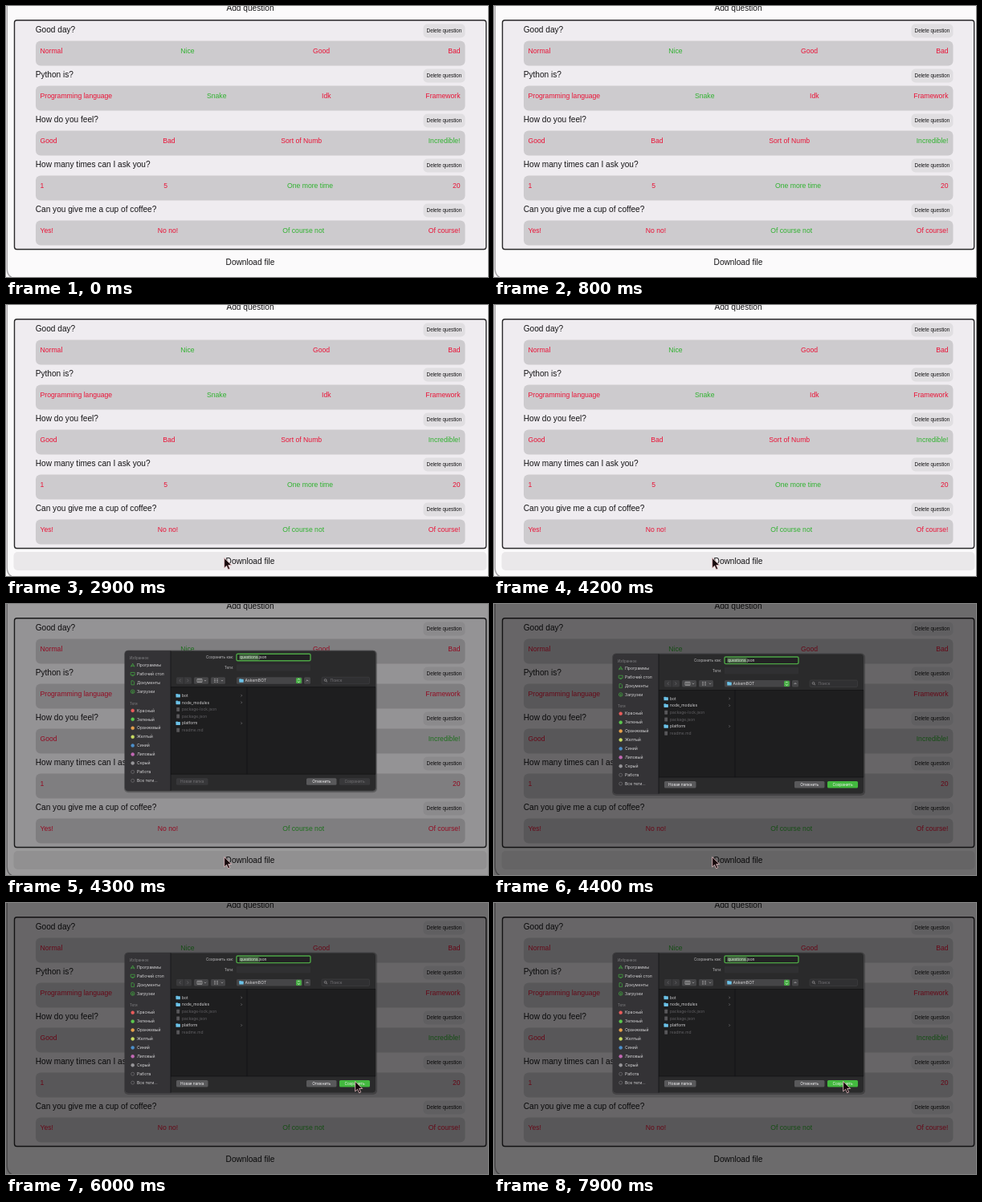
Write an HTML page that moves like this. It is 600x338 px and loops after 8000 ms.

```html
<!DOCTYPE html>
<html lang="en">
<head>
<meta charset="utf-8">
<title>Quiz editor</title>
<style>
  html, body { margin: 0; width: 100%; height: 100%; overflow: hidden; background: #fbfafb; }
  svg { display: block; width: 100%; height: 100%; }
  #page text { font-family: "Liberation Sans", Arial, sans-serif; }
  #dialog text { font-family: Inter, Roboto, sans-serif; }
</style>
</head>
<body>
<svg id="stage" viewBox="0 0 600 338">
  <g id="page"></g>
  <rect id="shade" width="600" height="338" opacity="0"/>
  <g id="dialog"></g>
  <path id="cursor" d="M0 0V12.5L2.9 9.8L4.9 14.3L7 13.4L5 9H9Z" fill="#16090c" stroke="#ecc4c8" stroke-width=".8"/>
</svg>
<script>
const LOOP = 8000, STEP = 100;
const INK = '#151416', RED = '#ea1236', GREEN = '#2fb22f';
const $ = id => document.getElementById(id);
const page = $('page'), dialog = $('dialog');

function add(parent, tag, attrs, content) {
  const el = document.createElementNS('http://www.w3.org/2000/svg', tag);
  for (const k in attrs) el.setAttribute(k, attrs[k]);
  if (content) el.textContent = content;
  return parent.appendChild(el);
}
const box = (parent, x, y, width, height, rx, fill, more) =>
  add(parent, 'rect', { x, y, width, height, rx, fill, ...more });
const line = (parent, d, stroke, width = .7) =>
  add(parent, 'path', { d, stroke, 'stroke-width': width, fill: 'none' });
// y is the middle of the lower-case letters plus ascenders
const label = (parent, x, y, str, size, fill, anchor = 'start') =>
  add(parent, 'text', { x, y: y + size * .34, 'font-size': size, fill, 'text-anchor': anchor }, str);

// Page: [question, index of the right answer, answers, x of the inner answers]
const quiz = [
  ['Good day?', 1, ['Normal', 'Nice', 'Good', 'Bad'], [217.3, 382]],
  ['Python is?', 1, ['Programming language', 'Snake', 'Idk', 'Framework'], [250, 393]],
  ['How do you feel?', 3, ['Good', 'Bad', 'Sort of Numb', 'Incredible!'], [195.3, 342.3]],
  ['How many times can I ask you?', 2, ['1', '5', 'One more time', '20'], [196.3, 350]],
  ['Can you give me a cup of coffee?', 2, ['Yes!', 'No no!', 'Of course not', 'Of course!'], [188.8, 344.3]]
];

box(page, 0, 0, 600, 338, 0, '#fbfafb');
line(page, 'M1.3 0V328Q1.3 336 8 339', '#a5a3a6', 1.4);
label(page, 304, 2.7, 'Add question', 10.15, INK, 'middle');
box(page, 10.5, 17.8, 587.2, 285.7, 3, '#efecf0', { stroke: '#29282a', 'stroke-width': 1.4 });
const hover = box(page, 9.5, 308, 589, 23, 5, '#eae8ea');
label(page, 304, 319.7, 'Download file', 10.15, INK, 'middle');

quiz.forEach(([question, right, answers, inner], row) => {
  const y = 30 + row * 56;
  label(page, 36.7, y, question, 10.15, INK);
  box(page, 519.5, y - 7.5, 52, 17, 5, '#e0dee1');
  label(page, 545.5, y + 1.2, 'Delete question', 6.3, INK, 'middle');
  box(page, 37, y + 13.5, 534.5, 31, 6, '#cdcbce');
  answers.forEach((answer, i) =>
    label(page, [42.5, ...inner, 565.5][i], y + 26.4, answer, 8.65,
      i === right ? GREEN : RED, i === 3 ? 'end' : 'start'));
});

// Save dialog
const PALE = '#d6d5d7', DIM = '#626164', ACCENT = '#46ad43', FIELD = '#303032';
box(dialog, 147, 61.5, 315, 177.5, 5, '#000', { opacity: .25 });
box(dialog, 148, 62, 312.5, 175, 4, '#2a2a2b', { stroke: '#4c4c4e', 'stroke-width': .7 });
line(dialog, 'M205 62.4H152Q148.4 62.4 148.4 66V233Q148.4 236.6 152 236.6H205Z', 'none')
  .setAttribute('fill', '#343336');
box(dialog, 205, 107.5, 255.2, 108.5, 0, '#1e1e1f');
line(dialog, 'M205 62.4V236.6M205 107.5H460M205 216H460M300 107.5V216', '#111112');

label(dialog, 154, 71.3, 'Избранное', 4.4, '#818083');
const icons = [
  'M-2 2L0-2.4L2 2M-2.6.7H2.6',
  'M-2.5-2H2.5V1.2H-2.5ZM-1.2 2.3H1.2',
  'M-1.7-2.5H.6L1.8-1.2V2.5H-1.7Z',
  'M-2.3 0A2.3 2.3 0 1 0 2.3 0A2.3 2.3 0 1 0-2.3 0M0-1.2V1.2M-1 .3L0 1.2L1 .3'
];
['Программы', 'Рабочий стол', 'Документы', 'Загрузки'].forEach((name, i) => {
  const y = 80.3 + i * 10.9;
  line(dialog, icons[i], ACCENT).setAttribute('transform', `translate(157.7 ${y})`);
  label(dialog, 163, y, name, 5.1, PALE);
});

label(dialog, 154, 128, 'Теги', 4.4, '#818083');
const tags = {
  'Красный': '#ea5c5c', 'Зеленый': '#5cc84f', 'Оранжевый': '#e6a04c', 'Желтый': '#c8dc62',
  'Синий': '#4c8fcb', 'Лиловый': '#c268b4', 'Серый': '#98979a', 'Работа': '', 'Все теги...': ''
};
Object.entries(tags).forEach(([name, color], i) => {
  const cy = 136.7 + i * 10.93;
  add(dialog, 'circle', { cx: 157.7, cy, r: 2, fill: color || 'none', stroke: color || '#88878a', 'stroke-width': .5 });
  label(dialog, 163, cy, name, 5.1, PALE);
});

label(dialog, 283.3, 70.3, 'Сохранить как:', 4.6, '#bdbcbe', 'end');
box(dialog, 287, 66, 92, 8.6, 1.5, '#222223', { stroke: '#4da545', 'stroke-width': 1.4 });
box(dialog, 290.5, 67.4, 24, 5.9, 0, '#4c6f49');
label(dialog, 291, 70.3, 'questions.json', 4.9, '#e2e1e3');
label(dialog, 283.3, 83, 'Теги:', 4.6, '#bdbcbe', 'end');
box(dialog, 287, 79, 92, 8.3, 1, FIELD);

// Toolbar
box(dialog, 212, 95, 19, 8.5, 1.5, '#3a3a3c');
line(dialog, 'M217.5 97.5L216 99.3L217.5 101M225.5 97.5L227 99.3L225.5 101', '#6c6b6e');
line(dialog, 'M221.5 95V103.5', '#2a2a2b');
[234, 255].forEach((x, i) => {
  box(dialog, x, 95, 18, 8.5, 1.5, '#454547');
  line(dialog, i ? `M${x + 4} 97.5h2m1 0h2M${x + 4} 99.3h2m1 0h2M${x + 4} 101.1h2m1 0h2`
                 : `M${x + 4} 97.3h6v4h-6ZM${x + 6} 97.3v4m2 0v-4`, '#c4c3c5', .6);
  line(dialog, `M${x + 12.8} 98.7l1.2 1.2l1.2-1.2`, '#c4c3c5', .6);
});
function folder(x, y) {
  box(dialog, x, y - 2.3, 2.6, 2, .5, '#4aa3cd');
  box(dialog, x, y - 1.7, 5.4, 4, .6, '#6cc1e6');
}
box(dialog, 287, 95, 82, 8.5, 1.5, '#454547');
folder(290.3, 99.3);
label(dialog, 297.5, 99.3, 'AskemBOT', 5.1, PALE);
box(dialog, 361, 95.7, 6.8, 7.2, 1.5, ACCENT);
line(dialog, 'M363.1 98.4L364.4 97.1L365.7 98.4M363.1 100.2L364.4 101.5L365.7 100.2', '#fff');
box(dialog, 371, 95, 8, 8.5, 1.5, '#454547');
line(dialog, 'M373.6 100L375 98.6L376.4 100', '#d0cfd1');
box(dialog, 393, 95, 59.5, 8.5, 1.5, FIELD, { stroke: '#454547', 'stroke-width': .5 });
add(dialog, 'circle', { cx: 397.6, cy: 98.8, r: 1.4, fill: 'none', stroke: '#a9a8aa', 'stroke-width': .6 });
line(dialog, 'M398.6 99.8L400 101.2', '#a9a8aa');
label(dialog, 403.5, 99.3, 'Поиск', 4.9, '#737275');

['bot', 'node_modules', 'package-lock.json', 'package.json', 'platform', 'readme.md'].forEach((name, i) => {
  const y = 118 + i * 8.63, isFile = name.includes('.');
  if (isFile) {
    box(dialog, 212.3, y - 2.5, 3.8, 5, .4, '#58575a');
  } else {
    folder(211.5, y);
    line(dialog, `M292.5 ${y - 1.3}l1.2 1.3l-1.2 1.3`, '#8b8a8d', .6);
  }
  label(dialog, 219, y, name, 4.95, isFile ? DIM : PALE);
});

function button(x, width, str, fill = '#59595b') {
  const rect = box(dialog, x, 221, width, 8.6, 1.6, fill);
  const text = label(dialog, x + width / 2, 225.3, str, 4.8, '#f0eff1', 'middle');
  return on => {
    rect.setAttribute('fill', on ? fill : '#38383a');
    text.setAttribute('fill', on ? '#f0eff1' : '#717073');
  };
}
const newFolder = button(212, 39.5, 'Новая папка');
button(374, 37.5, 'Отменить');
const save = button(415, 38, 'Сохранить', '#43b93f');

// Motion
const clamp = v => Math.max(0, Math.min(1, v));
const smooth = v => v * v * (3 - 2 * v);
const bend = (a, b, c, u) => (1 - u) ** 2 * a + 2 * u * (1 - u) * b + u * u * c;
const show = (el, on) => el.setAttribute('visibility', on ? 'visible' : 'hidden');

function cursorAt(t) {
  if (t < 4800) {
    const u = smooth(clamp((t - 2000) / 900));
    return [bend(233.3, 312, 271.7, u), bend(200.3, 265, 315.5, u)];
  }
  const u = smooth(clamp((t - 4800) / 900));
  return [bend(271.7, 345, 434.7, u), bend(315.5, 285, 222.5, u)];
}

function draw(t) {
  const [x, y] = cursorAt(t);
  show($('cursor'), t >= 2000);
  $('cursor').setAttribute('transform', `translate(${x} ${y})`);
  show(hover, t >= 2000 && y > 306);
  $('shade').setAttribute('opacity', Math.min(.57, Math.max(0, t - 4200) * .0038));
  show(dialog, t >= 4300);
  const ready = t >= 4400;
  dialog.setAttribute('transform', `translate(0 ${ready ? 0 : -3.8})`);
  newFolder(ready);
  save(ready);
}

const start = performance.now();
function tick() {
  const t = (performance.now() - start) % LOOP;
  draw(Math.floor(t / STEP) * STEP);
  requestAnimationFrame(tick);
}
tick();
</script>
</body>
</html>
```
